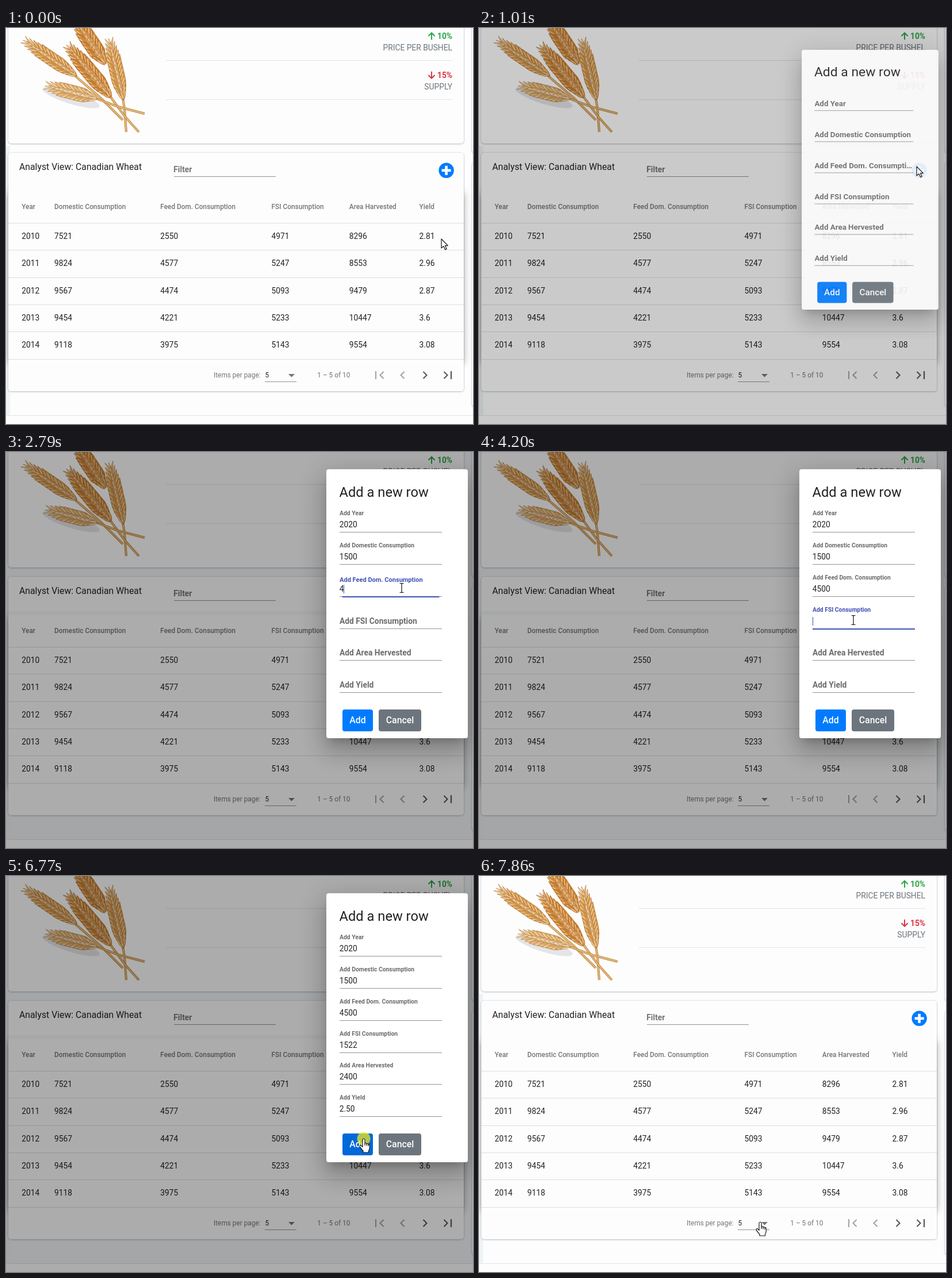
These frames come from a looping animation (812 by 689 pixels, 8000 ms). An HTML page with a canvas:

```html
<!DOCTYPE html>
<html lang="en">
<head>
<meta charset="utf-8">
<title>Add a row</title>
<style>
html, body { margin: 0; width: 812px; height: 689px; overflow: hidden; background: #fdfdfd; }
body { position: relative; font: 13.8px Roboto, sans-serif; color: rgba(0,0,0,.87); }
div, canvas { position: absolute; box-sizing: border-box; }
canvas { left: 0; top: 0; }
.text { height: 30px; line-height: 30px; white-space: nowrap; }
#page { width: 812px; height: 689px; background: #fdfdfd; overflow: hidden; }
#page.shaded { background: #f2f4f6; }
#page.shaded .header { border-bottom: 6px solid #f4f5f6; }
.card { background: #fdfdfd; border-radius: 5px; box-shadow: 0 0 0 1px rgba(60,90,110,.1), 0 1px 3px rgba(40,70,90,.28); }
.fill { background: #fdfdfd; }
.table { box-shadow: 0 5px 5px -3px rgba(0,0,0,.2), 0 8px 10px 1px rgba(0,0,0,.14), 0 3px 14px 2px rgba(0,0,0,.12); }
.head { color: rgba(0,0,0,.54); font-size: 11.85px; font-weight: 500; }
.small { color: rgba(0,0,0,.54); font-size: 11.85px; }
.right { left: auto !important; right: 36px; color: #6c757d; }
#dim { width: 812px; height: 689px; background: rgba(0,0,0,.32); }
#dialog { left: 557px; top: 30px; width: 246px; height: 468px; border-radius: 4px; background: #fff;
  box-shadow: 0 11px 15px -7px rgba(0,0,0,.2), 0 24px 38px 3px rgba(0,0,0,.14), 0 9px 46px 8px rgba(0,0,0,.12); }
.label { font-weight: 700; transform-origin: 0 50%; overflow: hidden; text-overflow: ellipsis; }
.value { display: flex; align-items: center; }
.value i { width: 1px; height: 15px; background: #3f51b5; }
.btn { border-radius: 4px; color: #fff; font: 500 15.8px/38px Roboto, sans-serif; text-align: center; }
</style>
</head>
<body>
<div id="page"></div>
<div id="dim"></div>
<div id="dialog"></div>
<canvas id="top" width="812" height="689"></canvas>
<script>
const page = document.getElementById('page');
const dim = document.getElementById('dim');
const dialog = document.getElementById('dialog');

function add(parent, cls, x, y, w, h, css = '') {
  const el = document.createElement('div');
  el.className = cls;
  el.style.cssText = `left:${x}px;top:${y}px;` + (w ? `width:${w}px;` : '') + (h ? `height:${h}px;` : '') + css;
  parent.appendChild(el);
  return el;
}
// Text whose capitals are centred on cy
function text(parent, x, cy, str, cls = '', css = '') {
  const el = add(parent, 'text ' + cls, x, cy - 15, 0, 0, css);
  el.textContent = str;
  return el;
}
const rule = (x, y, w, color) => add(page, '', x, y, w, 1, `background:${color}`);

/* ---------- page ---------- */
const rowY = i => Math.round(339 + i * 47.35);
add(page, 'fill', 0, 205, 7, 470, 'background:#f0f3f5');
add(page, 'card', 4, -20, 792, 221);
add(page, 'card', 810, -20, 40, 237);
add(page, 'card', 810, 234, 40, 425);
add(page, 'card', 4, 217, 792, 415);
add(page, 'fill table', 4, 283, 792, 293);
add(page, 'fill header', 5, 218, 790, 65);
add(page, 'fill', 4, 576, 792, 56, 'border-radius:0 0 5px 5px');
add(page, 'fill', 0, 675, 812, 14);
rule(0, 674, 812, '#dce4e9');

const green = '#28a745', red = '#dc3545';
[['10%', 'PRICE PER BUSHEL', green], ['15%', 'SUPPLY', red]].forEach(([num, name, color], i) => {
  const y = 14 + i * 68;
  text(page, 0, y, num, 'right', `color:${color};font-weight:700`);
  text(page, 0, y + 20, name, 'right');
  rule(278, y + 42, 498, '#dde4e8');
});

text(page, 23, 242, 'Analyst View: Canadian Wheat', '', 'font-size:15.8px');
text(page, 291.3, 246, 'Filter', '', 'font-weight:700;color:rgba(0,0,0,.54)');
rule(292, 258, 177, 'rgba(0,0,0,.42)');

const cols = [27.2, 84, 268.3, 461.6, 596.8, 718.6];
['Year', 'Domestic Consumption', 'Feed Dom. Consumption', 'FSI Consumption', 'Area Harvested', 'Yield']
  .forEach((s, i) => text(page, cols[i], 311, s, 'head'));
['2010 7521 2550 4971 8296 2.81', '2011 9824 4577 5247 8553 2.96', '2012 9567 4474 5093 9479 2.87',
 '2013 9454 4221 5233 10447 3.6', '2014 9118 3975 5143 9554 3.08'].forEach((row, r) =>
  row.split(' ').forEach((s, i) => text(page, cols[i], rowY(r) + 23, s)));
for (let i = 0; i < 6; i++) rule(4, rowY(i), 792, 'rgba(0,0,0,.12)');

text(page, 361, 604, 'Items per page:', 'small');
text(page, 450.5, 604, '5', '', 'font-size:11.85px');
text(page, 541.3, 604, '1 – 5 of 10', 'small');
rule(450, 615, 55, 'rgba(0,0,0,.42)');

/* ---------- drawn art ---------- */
const art = document.createElement('canvas');
art.width = 812; art.height = 689;
page.appendChild(art);
const a = art.getContext('2d');

function line(c, pts, color, width) {
  c.beginPath();
  for (let i = 0; i < pts.length; i += 2) c.lineTo(pts[i], pts[i + 1]);
  c.strokeStyle = color;
  c.lineWidth = width;
  c.stroke();
}
function disc(c, x, y, r, color) {
  c.fillStyle = color;
  c.beginPath();
  c.arc(x, y, r, 0, 7);
  c.fill();
}
function kernel(x, y, angle, len, wid, color) {
  a.save();
  a.translate(x, y);
  a.rotate(angle);
  a.beginPath();
  a.moveTo(-len, 0);
  a.quadraticCurveTo(-len * .4, -wid * 1.5, len, 0);
  a.quadraticCurveTo(-len * .4, wid * 1.5, -len, 0);
  a.fillStyle = color;
  a.fill();
  a.strokeStyle = 'rgba(150,92,32,.5)';
  a.lineWidth = .7;
  a.stroke();
  line(a, [-len * .6, -wid * .2, len * .6, -wid * .1], 'rgba(255,236,195,.7)', 1.3);
  a.restore();
}
// Ear of grain from its tip down to its base
function ear(tx, ty, bx, by, width, hue, light) {
  const dir = Math.atan2(ty - by, tx - bx), n = Math.round(Math.hypot(tx - bx, ty - by) / 8);
  const nx = -Math.sin(dir), ny = Math.cos(dir);
  const tone = d => `hsl(${hue},62%,${light + d}%)`;
  for (let i = 0; i <= n; i++) {
    const k = i / n, x = tx + (bx - tx) * k, y = ty + (by - ty) * k;
    const w = width * Math.min(1, .4 + 1.8 * k, .5 + 2.4 * (1 - k));
    for (const s of [-1, 1])
      kernel(x + nx * s * w * .3, y + ny * s * w * .3, dir + s * .42, 10, w * .19, tone((i + (s > 0)) % 2 * -6));
    kernel(x, y, dir + (i % 2 ? .12 : -.12), 8.5, w * .17, tone(6));
  }
}
function stem(...pts) {
  line(a, pts, '#b57d3a', 4);
  line(a, pts, '#e4b876', 2.4);
}
a.fillStyle = 'rgba(120,125,140,.18)';
a.beginPath();
a.ellipse(113, 121, 52, 11, .3, 0, 7);
a.fill();
stem(114, 78, 165, 122, 203, 160);
stem(202, 116, 206, 140, 209, 181);
stem(176, 112, 206, 153, 231, 181);
stem(150, 120, 195, 137, 241, 149);
ear(181, 26, 202, 117, 27, 33, 60);
ear(37, 25, 116, 79, 26, 33, 60);
ear(124, -10, 168, 56, 33, 31, 54);
ear(111, 35, 177, 114, 32, 31, 54);
ear(76, 102, 151, 121, 28, 34, 68);

function chevron(x, y, dx, dy, color, s = 6) {
  line(a, [x - s * (dx + dy), y - s * (dy - dx), x, y, x - s * (dx - dy), y - s * (dy + dx)], color, 2.1);
}
const off = 'rgba(0,0,0,.36)', on = 'rgba(0,0,0,.66)';
a.lineCap = 'round';
line(a, [740, 19.5, 740, 9], green, 2.1);
chevron(740, 8.5, 0, -1, green, 5);
line(a, [740, 76.5, 740, 87], red, 2.1);
chevron(740, 87.5, 0, 1, red, 5);
a.lineCap = 'butt';
disc(a, 765.6, 247.8, 13.2, '#007bff');
line(a, [757.6, 247.8, 773.6, 247.8], '#fff', 4.6);
line(a, [765.6, 239.8, 765.6, 255.8], '#fff', 4.6);
line(a, [643, 597, 643, 611], off, 2);
chevron(650.5, 604, -1, 0, off);
chevron(686.5, 604, -1, 0, off);
chevron(731.5, 604, 1, 0, on);
chevron(767.5, 604, 1, 0, on);
line(a, [774, 597, 774, 611], on, 2.2);
a.fillStyle = 'rgba(0,0,0,.54)';
a.fill(new Path2D('M491 602H502L496.5 607.5Z'));

/* ---------- dialog ---------- */
const LOOP = 8000, OPEN = 925, CLICK = 6690, CLOSE = 6842;
text(dialog, 22.5, 40, 'Add a new row', '', 'font-size:23.7px');
// Each field: name, value, time of its first and last keystroke
const fields = [
  ['Add Year', '2020', 1230, 1570],
  ['Add Domestic Consumption', '1500', 1860, 2560],
  ['Add Feed Dom. Consumption', '4500', 2790, 3420],
  ['Add FSI Consumption', '1522', 4290, 4820],
  ['Add Area Hervested', '2400', 5060, 5840],
  ['Add Yield', '2.50', 5920, 6230]
].map(([name, value, first, last], i, all) => {
  const cy = Math.round(96.2 + i * 55.8);
  const val = text(dialog, 22.7, cy, '', 'value');
  const typed = val.appendChild(document.createElement('span'));
  const caret = val.appendChild(document.createElement('i'));
  const label = text(dialog, 23, cy, name, 'label');
  add(dialog, '', 23, cy + 13, 178, 1, 'background:rgba(0,0,0,.42)');
  const bar = add(dialog, '', 23, cy + 12.5, 178, 2, 'background:#3f51b5');
  const focus = i ? all[i - 1][3] + 70 : OPEN + 115;
  return { value, first, last, focus, cy, typed, caret, label, bar };
});
const addBtn = add(dialog, 'btn', 28, 418, 53, 38);
addBtn.textContent = 'Add';
add(dialog, 'btn', 91, 418, 74, 38, 'background:#6c757d').textContent = 'Cancel';

/* ---------- motion ---------- */
const clamp = x => Math.min(1, Math.max(0, x));
function bezier(x1, y1, x2, y2) {
  const at = (p, q, u) => 3 * p * u * (1 - u) ** 2 + 3 * q * u * u * (1 - u) + u ** 3;
  return x => {
    let lo = 0, hi = 1;
    for (let i = 0; i < 24; i++) {
      const mid = (lo + hi) / 2;
      if (at(x1, x2, mid) < clamp(x)) lo = mid; else hi = mid;
    }
    return at(y1, y2, hi);
  };
}
const swift = bezier(.25, .8, .25, 1), enter = bezier(0, 0, .2, 1);

// Places where the pointer arrives, and how long it travels there
const stops = [
  { at: 0, time: 1, x: 757, y: 367, kind: 'arrow' },
  { at: 530, time: 460, x: 761, y: 241, kind: 'hand', click: true },
  { at: OPEN, time: 1, x: 761, y: 241, kind: 'arrow' },
  ...fields.map((f, i) => ({
    at: i ? f.focus : f.first, time: i ? 80 : 160,
    x: 688 + 37 * Math.cos((i - 1) * Math.PI / 2), y: f.cy + 28, kind: 'beam', click: true
  })),
  { at: CLICK, time: 310, x: 622, y: 457, kind: 'hand', click: true },
  { at: 7860, time: 400, x: 489, y: 602, kind: 'hand' }
];

const c = document.getElementById('top').getContext('2d');
const arrow = new Path2D('M0 0V16L3.8 12.6 6.6 18.6 9.2 17.5 6.5 11.7H11.3Z');
const hand = new Path2D('M-2 1.5Q0-1.5 2 1.5V8Q4 6.5 5 9Q7 7.5 8 10Q10 9 10.3 11.5V16Q10 19 8.5 21V24H-1V21.5L-6.7 14.5Q-7.5 11.5-4.8 11.7L-2 14.5Z');
const knuckles = new Path2D('M2 8V12M5 9V12.5M8 10V13');
const beam = new Path2D('M-3.5-7.5H-1L0-6.5 1-7.5H3.5M-3.5 8.5H-1L0 7.5 1 8.5H3.5M0-7V8');

function drawPointer(t) {
  const i = stops.findLastIndex(s => s.at - s.time <= t);
  const to = stops[i], from = stops[i - 1] || to;
  const k = clamp((t - to.at + to.time) / to.time);
  const kind = k > .8 ? to.kind : from.kind;
  c.clearRect(0, 0, 812, 689);
  c.save();
  c.translate(from.x + (to.x - from.x) * k - 14 * Math.sin(Math.PI * k), from.y + (to.y - from.y) * k);
  if (to.click && t >= to.at && t < to.at + 150) disc(c, 0, 0, 11.5, 'rgba(250,235,20,.72)');
  c.lineJoin = 'round';
  c.fillStyle = '#fff';
  c.strokeStyle = '#15151c';
  c.lineWidth = 1.2;
  if (kind === 'beam') {
    c.stroke(beam);
  } else {
    const shape = kind === 'hand' ? hand : arrow;
    c.fill(shape);
    c.stroke(shape);
    if (shape === hand) c.stroke(knuckles);
  }
  c.restore();
}

function drawField(f, t, active) {
  const rise = swift((t - f.focus - 35) / 400), grow = swift((t - f.focus) / 300);
  const tint = active ? Math.min(1, rise * 1.8) * 100 : 0;
  const gap = (f.last - f.first) / (f.value.length - 1);
  f.typed.textContent = f.value.slice(0, Math.max(0, Math.floor((t - f.first) / gap + 1)));
  f.caret.style.opacity = active ? 1 : 0;
  f.label.style.width = t > f.focus + 35 ? '240px' : '177px';
  f.label.style.transform = `translateY(${-19.5 * rise}px) scale(${1 - .25 * rise})`;
  f.label.style.color = `color-mix(in srgb, #3f51b5 ${tint}%, rgba(0,0,0,.58))`;
  f.bar.style.transform = `scaleX(${active ? grow : 0})`;
}

function draw(now) {
  const t = now % LOOP;
  const open = enter((t - OPEN) / 150);
  dim.style.opacity = swift((t - OPEN) / 400) - swift((t - CLOSE) / 400);
  dialog.style.opacity = t < OPEN ? 0 : open - clamp((t - CLOSE) / 75);
  dialog.style.transform = `scale(${.7 + .3 * open})`;
  page.className = t > OPEN + 150 && t < CLOSE + 320 ? 'shaded' : '';
  const active = t < CLICK ? fields.findLast(f => f.focus <= t) : null;
  fields.forEach(f => drawField(f, t, f === active));
  addBtn.style.background = t > CLICK - 60 ? '#0069d9' : '#007bff';
  drawPointer(t);
}
function loop() {
  draw(performance.now());
  requestAnimationFrame(loop);
}
loop();
</script>
</body>
</html>
```
